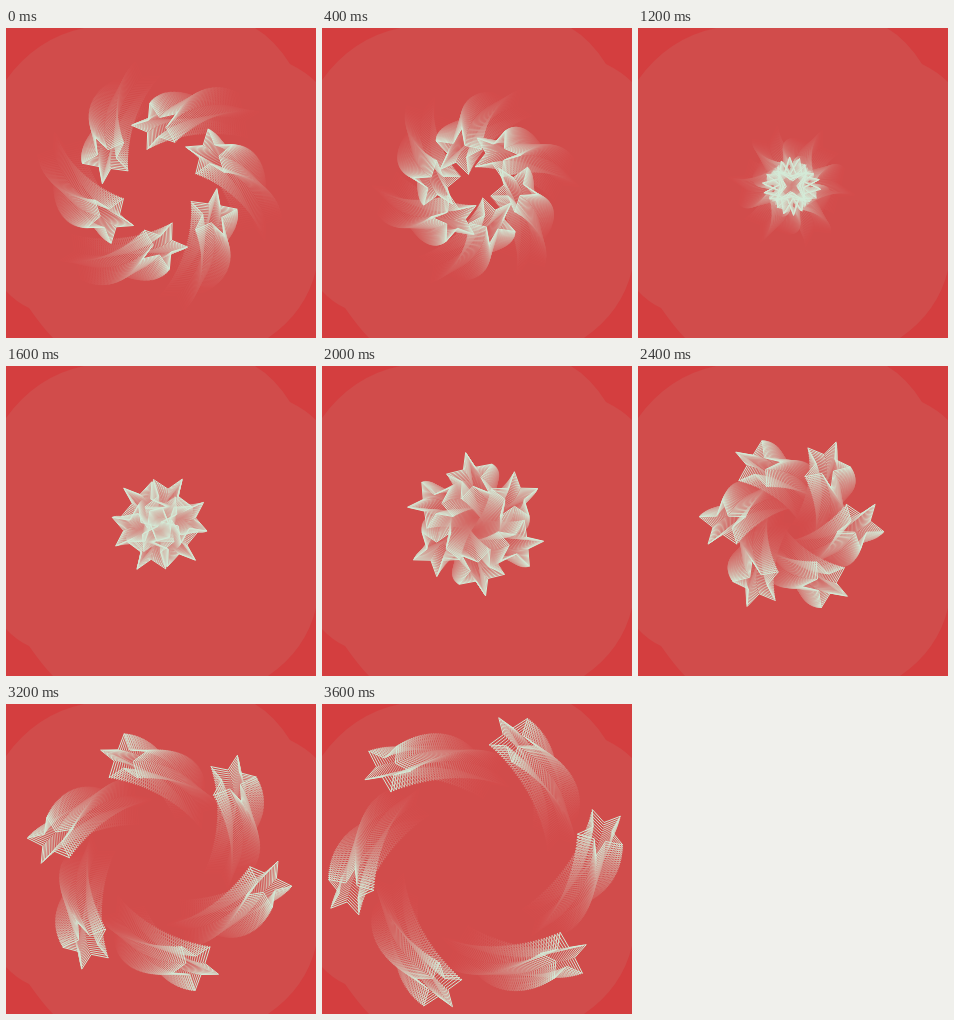
Write an HTML page with a canvas that moves like this. It is 310x310 px and loops after 3810 ms.

```html
<!DOCTYPE html>
<html lang="en">
<head>
<meta charset="utf-8">
<title>Star ring</title>
<style>
  html, body { margin: 0; width: 100%; height: 100%; overflow: hidden; background: #d43e3f; }
  canvas { display: block; width: 100%; height: 100%; }
</style>
</head>
<body>
<canvas id="stage" width="310" height="310"></canvas>
<script>
const ctx = document.getElementById('stage').getContext('2d');
const LOOP = 3810, STEP = 200, LAST = 3600;
const CENTER = { x: 153.6, y: 158.2 };
const STARS = 6, OUTER = 24.6, INNER = 10;
const TICK = 1000 / 60, KEEP = 0.95, TRAIL = 50;
const BASE = [212, 62, 63], GLOW = [209, 76, 75], INK = [212, 235, 216];
const rad = deg => deg * Math.PI / 180;

// The ring shrinks to a point, then opens again while it keeps turning.
const ringRadius = t => 286 * Math.abs(Math.sin(0.000189 * (t - 1110)));
const ringAngle = t => 206.6 - 0.0611 * t;

function trailColor(age) {
  const k = KEEP ** age;
  const [r, g, b] = BASE.map((c, i) => c + (INK[i] - c) * k);
  return `rgb(${Math.round(r)},${Math.round(Math.max(g, GLOW[1]))},${Math.round(Math.max(b, GLOW[2]))})`;
}

function addStar(x, y, turn) {
  for (let i = 0; i < 10; i++) {
    const a = rad(turn + i * 36), r = i % 2 ? INNER : OUTER;
    ctx.lineTo(x + r * Math.cos(a), y + r * Math.sin(a));
  }
  ctx.closePath();
}

function drawRing(t, color) {
  const r = ringRadius(t);
  ctx.strokeStyle = color;
  for (let i = 0; i < STARS; i++) {
    const angle = ringAngle(t) + i * 360 / STARS;
    ctx.beginPath();
    addStar(CENTER.x + r * Math.cos(rad(angle)), CENTER.y + r * Math.sin(rad(angle)), 90 - angle);
    ctx.stroke();
  }
}

function drawBackground() {
  ctx.fillStyle = `rgb(${BASE})`;
  ctx.fillRect(0, 0, 310, 310);
  ctx.fillStyle = `rgb(${GLOW})`;
  ctx.fill(new Path2D(`M78 0H249Q269 12 284 36Q300 44 310 54V242Q300 284 262 310H47
    Q37 300 23 280Q10 274 0 263V52Q30 10 78 0Z`));
}

function draw(t) {
  drawBackground();
  ctx.lineWidth = 1;
  for (let age = TRAIL; age >= 0; age--) drawRing(t - age * TICK, trailColor(age));
}

let shown = -1;
function tick() {
  const t = Math.min(LAST, Math.floor(performance.now() % LOOP / STEP) * STEP);
  if (t !== shown) draw(shown = t);
  requestAnimationFrame(tick);
}
tick();
</script>
</body>
</html>
```
